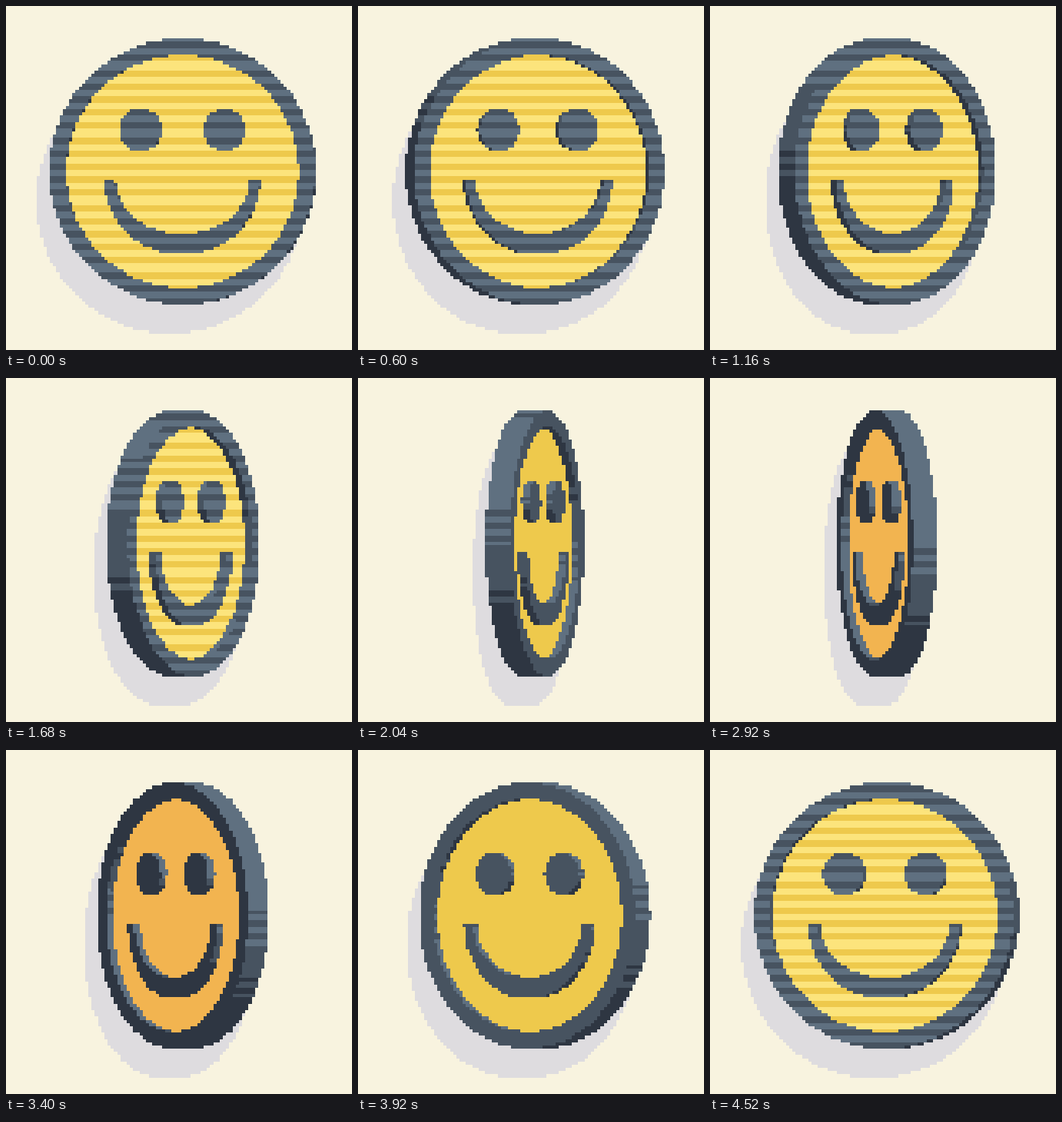
These frames come from a looping animation (450 by 447 pixels, 4560 ms). An HTML page with a canvas:

```html
<!DOCTYPE html>
<html>
<head>
<meta charset="utf-8">
<style>
html, body { margin: 0; height: 100%; overflow: hidden; background: #f8f3df; }
canvas { display: block; }
</style>
</head>
<body>
<canvas id="stage" width="450" height="447"></canvas>
<script>
const ctx = document.getElementById('stage').getContext('2d');
const LOOP = 4560, STEP = 40;
const CELL = 4.167, LEFT = 57, TOP = 42.3;   // lengths below are in cells
const R = 41.5, INNER = 36.3, HIGH = 4, LOW = 1.55, HALF = 41;
const DARK = ['#2e3642', '#475360', '#5f7080'];
const GOLD = ['#f2b450', '#eec94c', '#fce47c'];

const oval = (x, y, a, b) => b * (1 - Math.hypot(x / a, y / b));

// Positive on raised parts: rim, eyes and mouth
function relief(x, y) {
  const r = Math.hypot(x, y);
  const eyes = 6.6 - Math.hypot(Math.abs(x) - 13.1, y + 13);
  const mouth = Math.min(oval(x, y - 2.5, 24.3, 23.5), -oval(x, y - 2.5, 21, 17), y - 2.5);
  return Math.min(R - r, Math.max(r - INNER, eyes, mouth));
}

function solid(x, y, z) {
  if (Math.abs(z) > HIGH || x * x + y * y > R * R) return false;
  return Math.abs(z) <= LOW || relief(x, y) > 0;
}

// Three tones, with striped rows where two tones meet
function tone(light, row) {
  const phase = (row - 39.5) / 4.2;
  const lit = Math.abs(phase - Math.round(phase)) > 0.25;
  if (light > 1.078) return 2;
  if (light > 0.83) return lit ? 2 : 1;
  if (light > 0.5) return 1;
  if (light > 0.3) return lit ? 1 : 0;
  return 0;
}

// Colour of the coin seen at a cell, or null
function look(px, row, s, c) {
  const y = row - HALF;
  const reach = Math.sqrt(Math.max(0, R * R - y * y)) * Math.abs(s) + HIGH + 1;
  let oldZ = 99;
  for (let w = reach; w > -reach; w -= 0.15) {
    const x = px * c - w * s, z = px * s + w * c;
    if (!solid(x, y, z)) { oldZ = z; continue; }
    let nx = 0, ny = 0, nz = 0;
    if (!solid(x, y, oldZ)) nz = Math.sign(z);
    else {
      const e = 0.05;
      nx = relief(x - e, y) - relief(x + e, y);
      ny = relief(x, y - e) - relief(x, y + e);
      const n = Math.hypot(nx, ny) || 1;
      nx /= n;
      ny /= n;
    }
    const light = 0.4 * (nx * c + nz * s) - 0.88 * ny + (nz * c - nx * s);
    return (relief(x, y) > 0 ? DARK : GOLD)[tone(light, row)];
  }
  return null;
}

function cell(col, row, color) {
  const x = Math.round(LEFT + col * CELL), y = Math.round(TOP + row * CELL);
  ctx.fillStyle = color;
  ctx.fillRect(x, y, Math.round(LEFT + (col + 1) * CELL) - x, Math.round(TOP + (row + 1) * CELL) - y);
}

function draw(frame) {
  const angle = (-2.7 + 1.5 * frame) * Math.PI / 180;
  const s = Math.sin(angle), c = Math.cos(angle);
  const span = Math.ceil(R * Math.abs(c) + HIGH * Math.abs(s));
  const coin = [];
  for (let row = 0; row <= 2 * HALF; row++)
    for (let px = -span; px <= span; px++) {
      const color = look(px, row, s, c);
      if (color) coin.push([px + HALF, row, color]);
    }
  ctx.fillStyle = '#f8f3df';
  ctx.fillRect(0, 0, 450, 447);
  for (const [col, row] of coin) cell(col - 4, row + 9, '#dedcdf');
  for (const part of coin) cell(...part);
}

let shown = -1;
function tick() {
  const frame = Math.floor(performance.now() % LOOP / STEP);
  if (frame !== shown) draw(shown = frame);
  requestAnimationFrame(tick);
}
tick();
</script>
</body>
</html>
```
